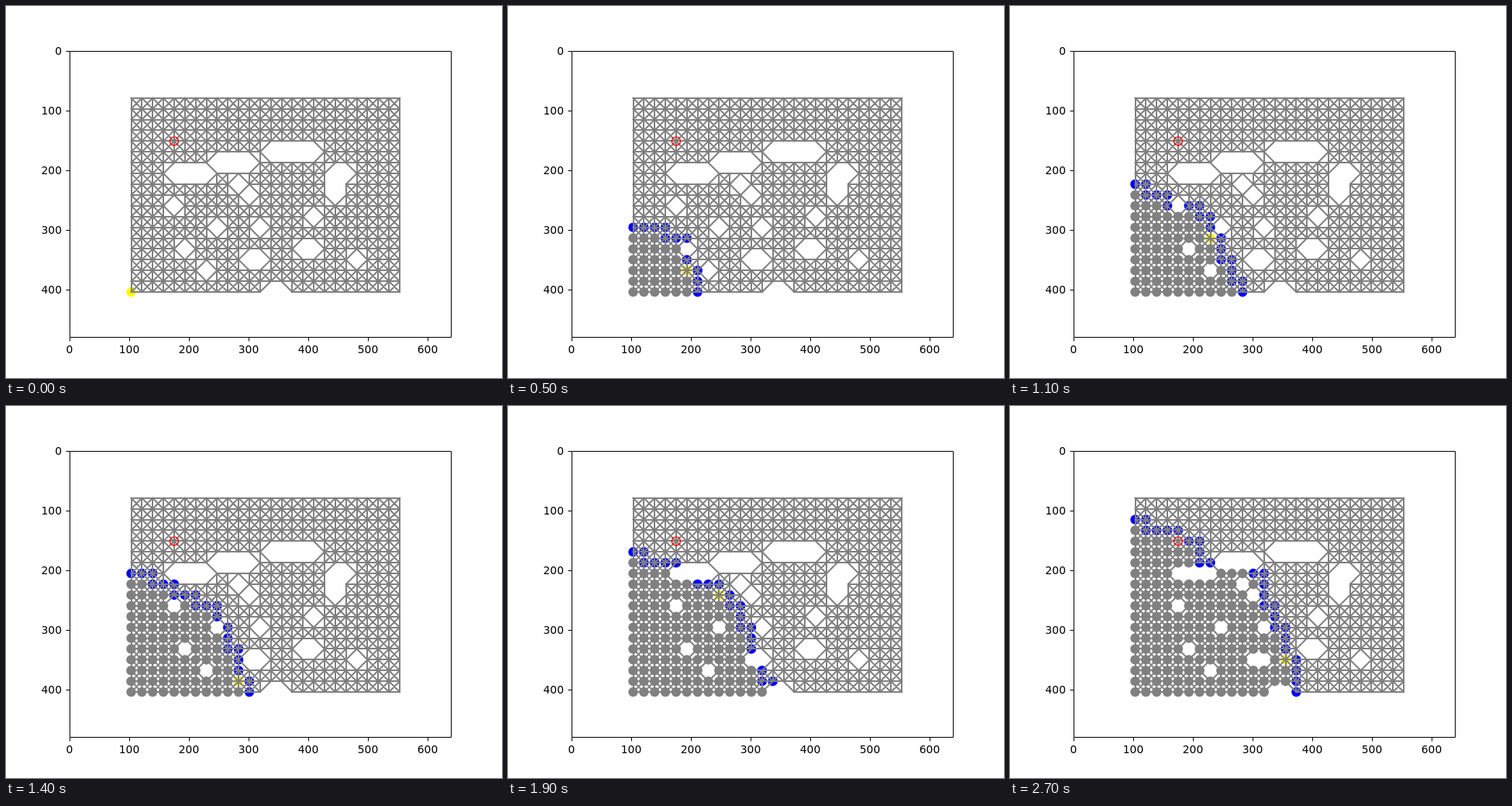
These frames come from a looping animation (640 px wide and 480 px high, 2.8 s). An HTML page:

```html
<!DOCTYPE html>
<html lang="en">
<head>
<meta charset="utf-8">
<title>Shortest path search</title>
<style>
  html, body { margin: 0; width: 100%; height: 100%; overflow: hidden; background: #fff; }
  svg { display: block; width: 640px; height: 480px; }
  text { font: 13.89px "DejaVu Sans", sans-serif; fill: #000; }
</style>
</head>
<body>
<svg id="plot" viewBox="0 0 640 480" xmlns="http://www.w3.org/2000/svg"></svg>
<script>
const COLS = 26, ROWS = 19, STEP_MS = 100, STEPS = 28, POPS = 6;
const START = [0, 0], GOAL = [4, 14];

// Blocked cells as [row, first column, last column], rows counted from the bottom.
const WALLS = [
  [0, 13, 14], [2, 7, 7], [3, 11, 12], [3, 21, 21], [4, 5, 5], [4, 16, 17],
  [6, 8, 8], [6, 12, 12], [7, 17, 17], [8, 4, 4], [9, 11, 11], [9, 19, 19],
  [10, 10, 10], [10, 19, 19], [11, 4, 7], [11, 19, 20], [12, 8, 11], [13, 13, 17]
];

const plot = document.getElementById("plot");
const px = c => 161.5 + 13.86 * c;
const py = r => 369.1 - 13.907 * r;
const id = (c, r) => r * COLS + c;

function add(tag, attrs, text) {
  const el = document.createElementNS("http://www.w3.org/2000/svg", tag);
  for (const k in attrs) el.setAttribute(k, attrs[k]);
  if (text !== undefined) el.textContent = text;
  return plot.appendChild(el);
}

const blocked = new Set();
for (const [r, a, b] of WALLS) for (let c = a; c <= b; c++) blocked.add(id(c, r));
const isFree = (c, r) =>
  c >= 0 && r >= 0 && c < COLS && r < ROWS && !blocked.has(id(c, r));

// Dijkstra over the 8-connected grid; returns a snapshot every POPS expansions.
function search() {
  const cost = new Map([[id(...START), 0]]);
  const open = new Set(cost.keys()), closed = new Set(), shots = [];
  for (let n = 0; n <= POPS * (STEPS - 1); n++) {
    let best = -1;
    for (const k of open) {
      const d = best < 0 ? -1 : cost.get(k) - cost.get(best);
      if (d < -1e-6 || (d < 1e-6 && k % COLS < best % COLS)) best = k;
    }
    open.delete(best);
    if (n % POPS === 0) {
      shots.push({ open: new Set(open), closed: new Set(closed), current: best });
    }
    closed.add(best);
    const c = best % COLS, r = Math.floor(best / COLS);
    for (let dc = -1; dc <= 1; dc++) for (let dr = -1; dr <= 1; dr++) {
      const k = id(c + dc, r + dr);
      if (!isFree(c + dc, r + dr) || closed.has(k)) continue;
      const next = cost.get(best) + Math.hypot(dc, dr);
      if (!cost.has(k) || next < cost.get(k)) cost.set(k, next);
      open.add(k);
    }
  }
  return shots;
}

// Node markers lie beneath the mesh.
const dots = new Map();
let straight = "", diagonal = "";
for (let r = 0; r < ROWS; r++) for (let c = 0; c < COLS; c++) {
  if (!isFree(c, r)) continue;
  dots.set(id(c, r), add("circle", { cx: px(c), cy: py(r), r: 6.25, fill: "none" }));
  for (const [dc, dr] of [[1, 0], [0, 1], [1, 1], [-1, 1]]) {
    if (!isFree(c + dc, r + dr)) continue;
    const f = dc && dr ? v => v.toFixed(2) : Math.round;
    const seg = `M${f(px(c))} ${f(py(r))}L${f(px(c + dc))} ${f(py(r + dr))}`;
    if (dc && dr) diagonal += seg; else straight += seg;
  }
}
const mesh = { fill: "none", stroke: "#808080", "stroke-linecap": "square" };
add("path", { ...mesh, d: diagonal, "stroke-width": 2.08 });
add("path", { ...mesh, d: straight, "stroke-width": 2 });
add("circle", {
  cx: px(GOAL[0]), cy: py(GOAL[1]), r: 5.56,
  fill: "none", stroke: "#f00", "stroke-width": 1.39
});

// Axes
let axes = "M82.5 58.5H574.5V427.5H82.5Z";
for (let v = 0; v <= 600; v += 100) {
  const x = 82 + 0.77 * v, y = 58 + 0.77 * v;
  axes += `M${x + 0.5} 427.5V432.5`;
  add("text", { x, y: 447.5, "text-anchor": "middle" }, v);
  if (v > 400) continue;
  axes += `M82.5 ${y + 0.5}H77.5`;
  add("text", { x: 72, y: y + 5, "text-anchor": "end" }, v);
}
add("path", { d: axes, fill: "none", stroke: "#000", "stroke-width": 1 });

const shots = search(), goalId = id(...GOAL);
let shown = -1;

function show(step) {
  if (step === shown) return;
  shown = step;
  const { open, closed, current } = shots[step];
  for (const [k, dot] of dots) {
    dot.setAttribute("fill",
      k === current ? "#ff0" :
      closed.has(k) ? "#808080" :
      open.has(k) && k !== goalId ? "#00f" : "none");
  }
}

const t0 = performance.now();
function tick() {
  show(Math.floor((performance.now() - t0) / STEP_MS) % STEPS);
  requestAnimationFrame(tick);
}
show(0);
requestAnimationFrame(tick);
</script>
</body>
</html>
```
